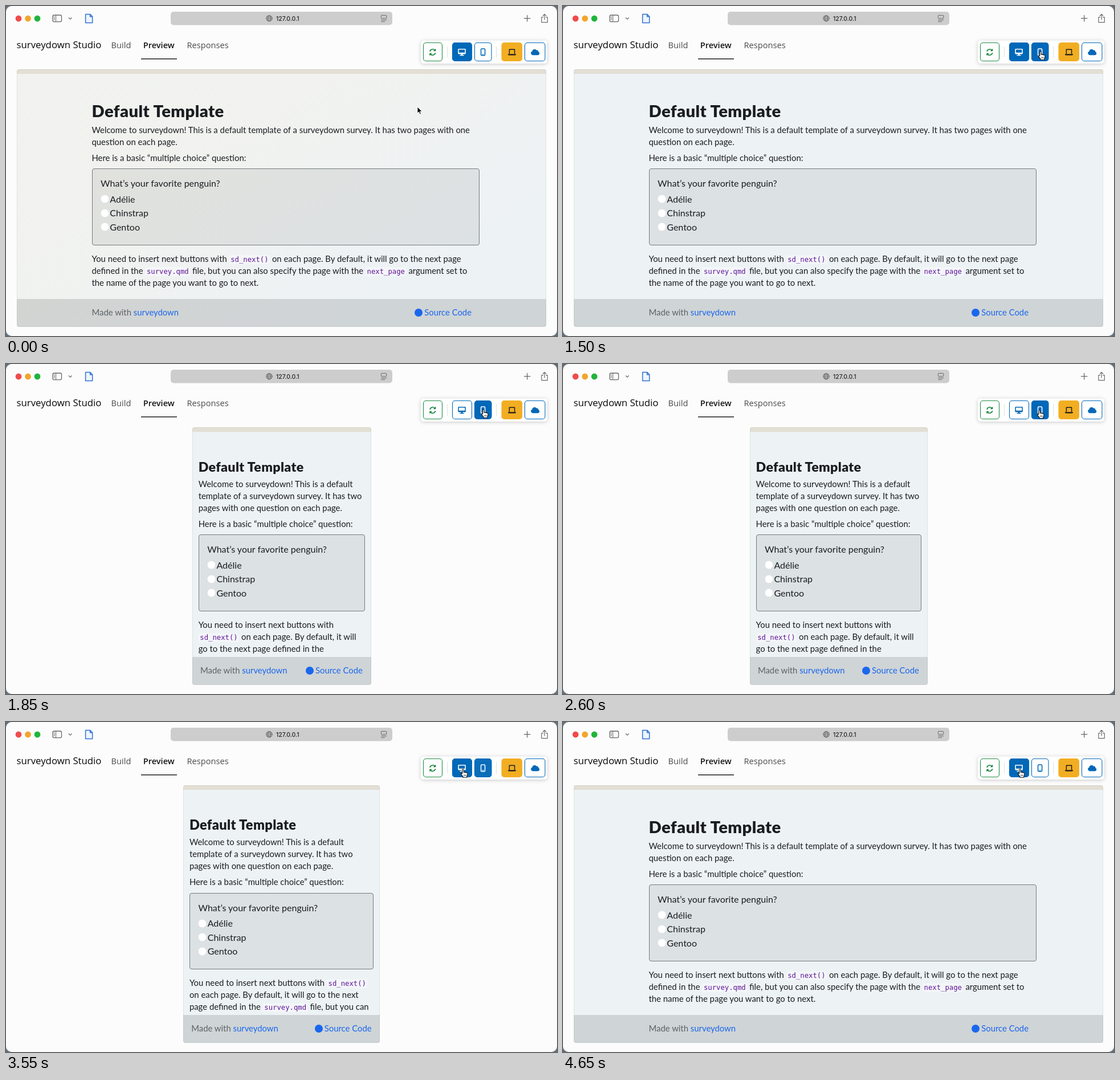
Write an HTML page that moves like this. It is 967 px wide and 579 px high and loops after 4700 ms.

```html
<!DOCTYPE html>
<html lang="en">
<head>
<meta charset="utf-8">
<title>Preview</title>
<style>
  html, body { margin: 0; width: 100%; height: 100%; overflow: hidden; background: #66727c; }
  #stage { position: relative; width: 967px; height: 579px; overflow: hidden; background: #fcfcfc; border-radius: 10px; }
  svg { position: absolute; left: 0; top: 0; }
  .nav { font-family: "Open Sans", "Noto Sans", sans-serif; font-size: 14.6px; fill: #4b4b4b; }
  #panel { position: absolute; top: 111px; height: 452px; overflow: hidden; border-radius: 4px;
    background: #edf2f5; color: #1a1d20; font: 14.86px/21px Lato, sans-serif; }
  #panel::after { content: ""; position: absolute; inset: 0; border-radius: 4px; box-shadow: inset 0 0 0 1px rgba(120, 120, 120, .13); }
  #bar { height: 8px; background: #e3dfd5; }
  #tint { position: absolute; inset: 8px 0 0; background: linear-gradient(150deg, rgba(246, 243, 233, .5) 30%, rgba(246, 243, 233, 0) 80%); }
  #view { position: absolute; inset: 8px 0 49px; overflow: hidden; }
  #page { position: absolute; top: 48.5px; }
  h1 { margin: 0 0 6px; font-weight: 900; line-height: 1.17; letter-spacing: .015em; white-space: nowrap; }
  p { margin: 0 0 7px; }
  h1, p { position: relative; top: -.9px; }
  .intro { margin-right: -6px; }
  .more { margin: 14px 4px 0 0; }
  code { font: 12.25px/1 "DejaVu Sans Mono", monospace; color: #5f1496; padding: 1px 2.6px; border-radius: 3px; background: rgba(248, 249, 250, .65); }
  #box { box-sizing: border-box; height: 134.5px; margin-top: 7.5px; padding: 13px 14.5px; border: 1px solid #747a7d; border-radius: 4px;
    background: rgba(0, 0, 0, .07); font-size: 16px; line-height: 24.5px; white-space: nowrap; }
  #box div:first-child { margin-bottom: 3px; }
  .opt { display: flex; align-items: center; }
  .opt i { width: 15px; height: 15px; margin-right: 1.3px; border-radius: 50%; background: #fff; box-shadow: inset 0 0 0 .6px #d3d8da; }
  #foot { position: absolute; left: 0; right: 0; top: 403px; height: 49px; background: rgba(0, 0, 0, .125); color: #5c6265; line-height: 47px; white-space: nowrap; }
  #foot span { position: absolute; }
  #foot b { font-weight: 400; color: #1a67ee; }
  #foot i { display: inline-block; width: 14px; height: 14px; margin-right: 3px; border-radius: 50%; background: #1a67ee; vertical-align: -2px; }
</style>
</head>
<body>
<div id="stage">
  <svg width="967" height="579" fill="none" stroke-linecap="round" stroke-linejoin="round">
    <circle cx="22" cy="22" r="5.4" fill="#f04b4c"/>
    <circle cx="38.5" cy="22" r="5.4" fill="#f3a52c"/>
    <circle cx="55" cy="22" r="5.4" fill="#20b43b"/>
    <g stroke="#696969" stroke-width="1.3">
      <rect x="82" y="16" width="15.5" height="11.6" rx="2.4"/>
      <path d="M87.6 16V27.5M84 19h1.6M84 21.3h1.6M84 23.6h1.6" stroke-width="1"/>
      <path d="M110.4 20.8l2.4 2.3 2.4-2.3"/>
      <path d="M909.5 21.7h10.4M914.7 16.5v10.4"/>
      <path d="M942.5 19.6h-2.6v9h10.4v-9h-2.6M945.1 24v-9.4M942.4 17l2.7-2.6 2.7 2.6" stroke-width="1.2"/>
    </g>
    <path d="M139.6 14.6h8.2l3.9 4v10.8h-12.1zM147.6 14.8v4h4" stroke="#2d6fd2" stroke-width="1.5" fill="#eef5ff"/>
    <rect x="289" y="10" width="389" height="23.5" rx="5" fill="#cdcdcd"/>
    <g stroke="#666" stroke-width="1">
      <circle cx="462" cy="21.7" r="5.2"/>
      <ellipse cx="462" cy="21.7" rx="2.4" ry="5.2"/>
      <path d="M457 21.7h10M457.8 19h8.4M457.8 24.4h8.4"/>
      <path d="M659.4 16.4h7.4q1 0 1 1v3.4q0 1-1 1h-7.4q-1 0-1-1v-3.4q0-1 1-1zM658.6 24.6h9M658.6 27.4h6"/>
    </g>
    <text x="474" y="25.6" font-family="Inter, sans-serif" font-size="10.4" font-weight="500" fill="#222">127.0.0.1</text>
    <g class="nav">
      <text x="18.5" y="74" style="font-size:16.8px;fill:#080808">surveydown Studio</text>
      <text x="184.6" y="73.5">Build</text>
      <text x="240.7" y="73.5" style="font-weight:600;fill:#151515">Preview</text>
      <text x="317.6" y="73.5">Responses</text>
    </g>
    <path d="M237 92.8h63" stroke="#1d2023" stroke-width="1.6" stroke-linecap="butt"/>

    <rect x="728" y="60.5" width="222" height="40.5" rx="5" fill="#fff" style="filter:drop-shadow(0 1px 3px rgba(0,0,0,.2))"/>
    <path d="M774.5 71v19M860.5 71v19" stroke="#dcdfe2"/>
    <g stroke-width="1.1">
      <rect x="732.5" y="64.5" width="33" height="32" rx="4.5" stroke="#1e8a45"/>
      <rect id="deskBtn" x="783.5" y="64.5" width="34" height="32" rx="4.5" stroke="#0068b8"/>
      <rect id="phoneBtn" x="822.5" y="64.5" width="29.5" height="32" rx="4.5" stroke="#0068b8"/>
      <rect x="870" y="64.5" width="35.5" height="32" rx="4.5" stroke="#f2ae22" fill="#f2ae22"/>
      <rect x="910.5" y="64.5" width="35.5" height="32" rx="4.5" stroke="#0068b8"/>
    </g>
    <g stroke="#16853c" stroke-width="1.7" stroke-linecap="butt">
      <path d="M744 79.8a5 5 0 0 1 8.6-2.4M753.6 82.2a5 5 0 0 1-8.6 2.4"/>
      <path d="M754 75.2v3.7h-3.7zM743.6 86.8v-3.7h3.7z" fill="#16853c" stroke-width=".6"/>
    </g>
    <path id="deskIcon" fill-rule="evenodd" d="M794.7 75h10.800q1.400 0 1.400 1.400v6.600q0 1.400-1.400 1.400h-4.200l.5 1.600h2v1.300h-7.400V86h2l.5-1.600h-4.200q-1.400 0-1.400-1.400v-6.600q0-1.400 1.400-1.400zM794.9 76.600v5.200h10.400v-5.200z"/>
    <g id="phoneIcon" stroke-width="1.6">
      <rect x="833.6" y="75" width="7" height="11.6" rx="1.4"/>
      <path d="M836.2 84.8h1.8" stroke-width="1"/>
    </g>
    <path d="M883.4 83.2v-6.900h9.200v6.900" stroke="#1c1c1c" stroke-width="1.5"/>
    <path d="M880.8 84.2h14.4q0 2.4-2 2.4h-10.4q-2 0-2-2.4z" fill="#1c1c1c"/>
    <path d="M924.3 86.2a3.3 3.3 0 0 1-.9-6.4 4.2 4.2 0 0 1 7.6-2.2 2.8 2.8 0 0 1 3.5 3 2.9 2.9 0 0 1-1 5.6z" fill="#0068b8"/>
  </svg>

  <div id="panel">
    <div id="bar"></div>
    <div id="tint"></div>
    <div id="view">
      <div id="page">
        <h1 id="title">Default Template</h1>
        <p class="intro">Welcome to surveydown! This is a default template of a surveydown survey. It has two pages&nbsp;with one question on each page.</p>
        <p class="intro">Here is a basic “multiple choice” question:</p>
        <div id="box">
          <div>What’s your favorite penguin?</div>
          <div class="opt"><i></i>Adélie</div>
          <div class="opt"><i></i>Chinstrap</div>
          <div class="opt"><i></i>Gentoo</div>
        </div>
        <p class="more">You need to insert next buttons with <code>sd_next()</code> on each page. By default, it will go to the next page defined in the <code>survey.qmd</code> file, but you can also specify the page with the <code>next_page</code> argument set to the name of the page you want to go to next.</p>
      </div>
    </div>
    <div id="foot">
      <span id="made">Made with <b>surveydown</b></span>
      <span id="code"><i></i><b>Source Code</b></span>
    </div>
  </div>

  <svg width="967" height="579" stroke-linejoin="round">
    <path id="arrow" d="M0 0v11.2l2.6-2.4 1.8 4.1 2-.9-1.8-3.9h3.6z" fill="#000" stroke="#fff" stroke-width=".9"/>
    <g id="hand">
      <path d="M-1.3 1q0-1.3 1.2-1.3T1.2 1v4.2q1.9-.9 2.4.4 1.7-.7 2.2.5 2.1-.6 2.2 1.4 0 3.3-1.2 5.3v1.5H0v-1.4Q-1.6 11-3.2 8.6q-.8-1.3.2-1.7.9-.3 1.7.8z" fill="#fff" stroke="#111" stroke-width="1.1"/>
      <path d="M1.7 9.3v2.6M3.5 9.3v2.6M5.3 9.3v2.6" stroke="#111" stroke-width=".7"/>
    </g>
  </svg>
</div>
<script>
const $ = id => document.getElementById(id);
const LOOP = 4700, STEP = 50, CENTER = 483.6, WIDE = 929.7, NARROW = 312;
const TO_PHONE = 1572, TO_DESK = 3529, HOVER_PHONE = 1100, HOVER_DESK = 3210;

const clamp = x => Math.min(1, Math.max(0, x));
const mix = (a, b, k) => a + (b - a) * k;

function bezier(x1, y1, x2, y2) {
  const at = (a, b, s) => 3 * a * s * (1 - s) ** 2 + 3 * b * s * s * (1 - s) + s ** 3;
  return x => {
    if (x <= 0 || x >= 1) return clamp(x);
    let lo = 0, hi = 1;
    for (let i = 0; i < 24; i++) {
      const mid = (lo + hi) / 2;
      if (at(x1, x2, mid) < x) lo = mid; else hi = mid;
    }
    return at(y1, y2, lo);
  };
}
const ease = bezier(.25, .1, .25, 1), inOut = bezier(.42, 0, .58, 1);
const resize = (t, start) => ease((t - start) / 300);
const fade = (t, start) => inOut((t - start) / 150);

// time, x, y of the pointer tip
const path = [[0, 722, 177], [100, 722, 177], [850, 814, 119], [1300, 838, 80], [2100, 838, 80],
  [2550, 836, 81], [3050, 836, 81], [3350, 802, 83], [LOOP, 802, 83]];

function pointer(t) {
  const i = path.findIndex(p => p[0] > t);
  const [t0, x0, y0] = path[i - 1], [t1, x1, y1] = path[i];
  const k = inOut((t - t0) / (t1 - t0));
  return [mix(x0, x1, k), mix(y0, y1, k)];
}

function paintButton(name, k) {
  const ink = `color-mix(in srgb, #fff ${k * 100}%, #0068b8)`;
  $(name + "Btn").style.fill = `rgba(0, 104, 184, ${k})`;
  $(name + "Icon").style[name === "desk" ? "fill" : "stroke"] = ink;
}

function draw(t) {
  const w = mix(WIDE, NARROW, resize(t, TO_PHONE) - resize(t, TO_DESK));
  const left = CENTER - w / 2, right = CENTER + w / 2;
  const start = Math.max(left + 11, 150.5), end = Math.min(right - 11, 831);
  $("panel").style.left = left + "px";
  $("panel").style.width = w + "px";
  $("page").style.left = start - left + "px";
  $("page").style.width = end - start + "px";
  $("title").style.fontSize = 23.2 + (w - NARROW) * .00968 + "px";
  $("made").style.left = Math.max(14.3, 150.5 - left) + "px";
  $("code").style.right = Math.max(14.7, right - 817) + "px";
  $("tint").style.opacity = 1 - clamp(t / 500);

  paintButton("desk", 1 - fade(t, TO_PHONE) + fade(t, HOVER_DESK));
  paintButton("phone", fade(t, HOVER_PHONE) - fade(t, TO_DESK));

  const [x, y] = pointer(t);
  const over = x > 783 && x < 852 && y < 97;
  for (const id of ["arrow", "hand"]) {
    $(id).setAttribute("transform", `translate(${x} ${y})`);
    $(id).style.display = (id === "hand") === over ? "" : "none";
  }
}

const begin = performance.now();
function tick() {
  const t = (performance.now() - begin) % LOOP;
  draw(Math.floor(t / STEP) * STEP);
  requestAnimationFrame(tick);
}
tick();
</script>
</body>
</html>
```
